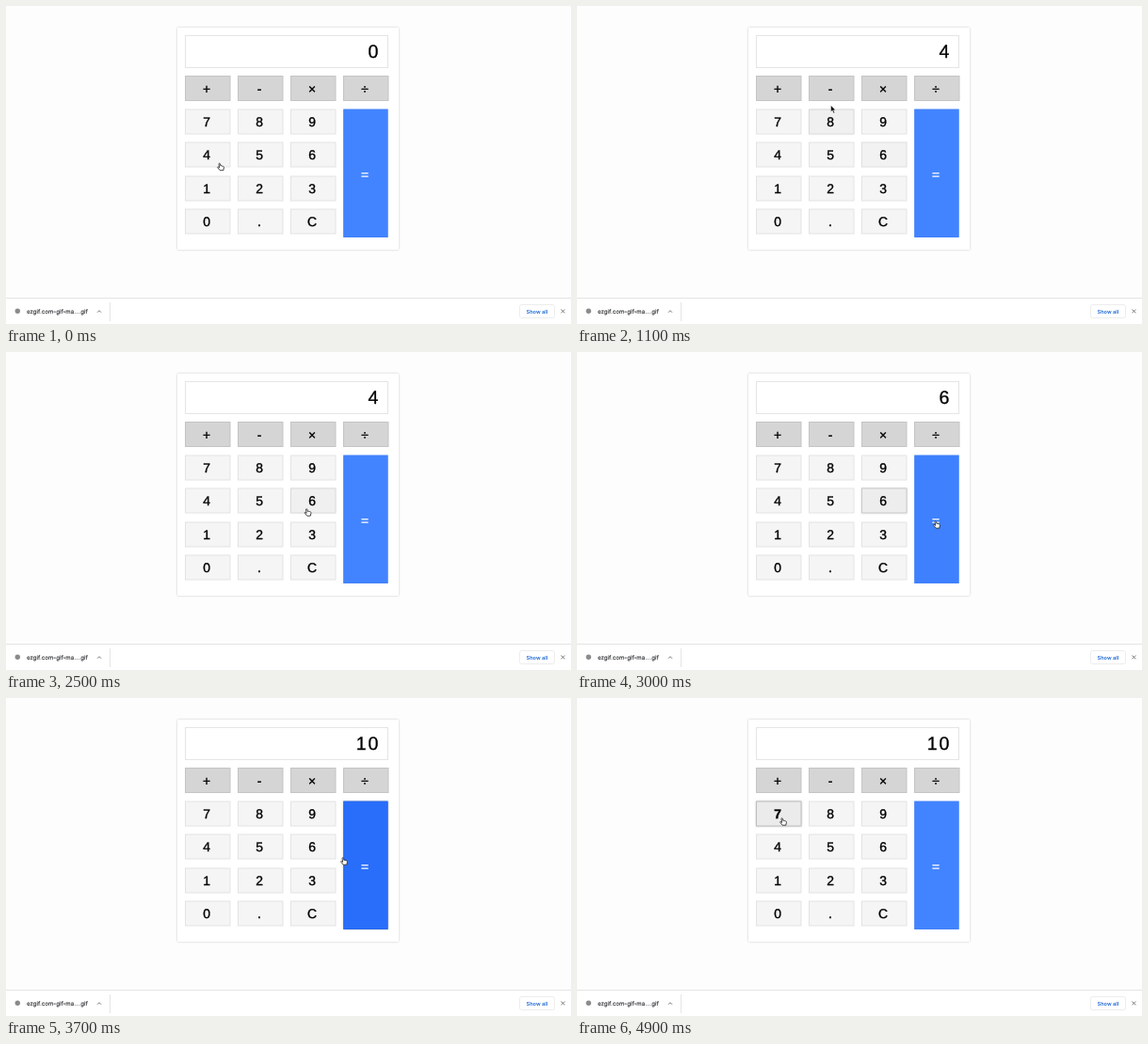
These frames come from a looping animation (600 by 338 pixels, 5 s). An HTML page:

```html
<!DOCTYPE html>
<html lang="en">
<head>
<meta charset="utf-8">
<title>Calculator</title>
<style>
  html, body { margin: 0; width: 100%; height: 100%; overflow: hidden; background: #fdfdfd; }
  svg { display: block; width: 600px; height: 338px; text-rendering: geometricPrecision; }
  .card { fill: #fff; filter: drop-shadow(0 .5px 1px rgba(0, 0, 0, .22)); }
  .keys text, .display { font-family: "Liberation Sans", Arial, sans-serif; }
  .keys text { font-size: 13.9px; text-anchor: middle; stroke: currentColor; stroke-width: .35; fill: currentColor; }
  .display { font-size: 19.6px; letter-spacing: 1.9px; text-anchor: end; stroke: #000; stroke-width: .3; }
  .bar text { font-family: Inter, Roboto, sans-serif; font-size: 6.15px; fill: #2b2d30; stroke: #2b2d30; stroke-width: .1; }
  .bar .link { font-size: 5.6px; font-weight: 600; fill: #1a66d6; stroke: none; }
  .line { fill: none; stroke: #e5e5e5; }
  .icon { fill: none; stroke: #55585c; stroke-width: .8; }
</style>
</head>
<body>
<svg viewBox="0 0 600 338">
  <rect class="card" x="182" y="23" width="235" height="236" rx="1"/>
  <rect class="line" x="190.5" y="31.5" width="215" height="34"/>
  <text class="display" id="display" x="397.4" y="54.5"></text>
  <g class="keys" id="keys"></g>
  <g class="bar">
    <rect y="311" width="600" height="27" fill="#fff"/>
    <path class="line" d="M0 310.5H600M110.5 315V335"/>
    <circle cx="12.3" cy="324.3" r="2.7" fill="#8b8b8b"/>
    <text x="22" y="326.9">ezgif.com-gif-ma....gif</text>
    <path class="icon" d="M97 325.7L99 323.7L101 325.7M589.5 322.5L593.3 326.3M593.3 322.5L589.5 326.3"/>
    <rect class="line" x="545.5" y="317.5" width="37" height="14" rx="2" stroke-opacity=".7"/>
    <text class="link" x="552.5" y="326.5">Show all</text>
  </g>
  <path id="arrow" d="M-1.5-4.5V2.6L.2 1.1L1.4 4L2.7 3.4L1.5.7H3.7Z" fill="#111" stroke="#fff" stroke-width=".5"/>
  <path id="hand" d="M-2.3-3.8C-1.6-4.7-.8-4.2-.6-3.4L0-1.1C.5-1.7 1.2-1.5 1.4-.9C2-1.4 2.7-1.1 2.9-.5C3.6-.7 4 0 3.9.9L3.2 4.2H-.9L-3.6 1C-4.2.1-3.3-.4-2.6.2L-1.5 1Z" fill="#fff" stroke="#222" stroke-width=".95" stroke-linejoin="round"/>
</svg>
<script>
const LOOP = 5000, STEP = 100, FADE = 300;
const $ = id => document.getElementById(id);
const clamp = v => Math.max(0, Math.min(1, v));
const mix = (a, b, k) => `rgb(${a.map((v, i) => Math.round(v + (b[i] - v) * k))})`;
const gray = v => [v, v, v];

// Resting and hovered colours: [fill, hover fill, border, hover border]
const styles = {
  number: [gray(245), gray(235), gray(227), gray(190)],
  operator: [gray(213), gray(204), gray(196), gray(176)],
  equals: [[66, 132, 255], [41, 110, 250], [66, 130, 250], [38, 102, 235]]
};

// Hover periods: [start, end]
const hovers = {
  "4": [[100, 600]], "6": [[700, 950], [2350, 2950]], "8": [[950, 1150]],
  "+": [[2150, 2350]], "=": [[2950, 3700]], "7": [[4500, 5300]]
};
const presses = { "4": [400, 600], "6": [2700, 2900], "7": [4800, 5000] };
const readings = [[0, "0"], [500, "4"], [2800, "6"], [3200, "10"]];

// Pointer path: [time, x, y, shape]
const path = [
  [0, 228, 171, "hand"], [100, 224, 167, "hand"], [500, 224, 167, "hand"],
  [700, 268, 171, "hand"], [900, 322, 172, "hand"], [1000, 292, 139, "arrow"],
  [1100, 271, 110, "arrow"], [1200, 276, 101, "arrow"], [1300, 280, 98, "hand"],
  [1500, 282, 97, "hand"], [1600, 282, 94, "hand"], [1700, 282, 94, "hand"],
  [2100, 213, 90, "hand"], [2300, 214, 91, "hand"], [2400, 268, 132, "arrow"],
  [2500, 320.5, 170.5, "hand"], [2800, 320.5, 170.5, "hand"], [3000, 382, 183.5, "hand"],
  [3600, 382, 183.5, "hand"], [3700, 359, 173.5, "hand"], [4000, 243.5, 143, "arrow"],
  [4400, 243.5, 143, "arrow"], [4500, 236, 139, "hand"], [4700, 222, 132, "hand"],
  [4900, 219, 131.5, "hand"], [5000, 219, 131.5, "hand"]
];

function add(tag, attrs) {
  const node = document.createElementNS("http://www.w3.org/2000/svg", tag);
  for (const name in attrs) node.setAttribute(name, attrs[name]);
  return $("keys").appendChild(node);
}

function makeKey(label, col, row, kind) {
  const x = 190.5 + col * 56, y = 74.7 + row * 35.3, isEquals = kind === "equals";
  const box = add("rect", {
    x: isEquals ? x + .2 : x, y: Math.round(y) + (row ? 0 : -.5),
    width: isEquals ? 46.5 : 47.5, height: isEquals ? 135.5 : 26
  });
  const text = add("text", {
    x: x + 22.5, y: isEquals ? 183.6 : y + 17.9, color: isEquals ? "#fff" : "#000"
  });
  text.textContent = label;
  return { label, kind, box, text };
}

const keys = [
  ...[..."+-×÷"].map((c, i) => makeKey(c, i, 0, "operator")),
  ...[..."7894561230.C"].map((c, i) => makeKey(c, i % 3, 1 + Math.floor(i / 3), "number")),
  makeKey("=", 3, 1, "equals")
];

function hoverLevel(label, t) {
  const level = ([start, end]) =>
    Math.min(clamp((t - start) / FADE), clamp((end - start) / FADE) - clamp((t - end) / FADE));
  return Math.max(0, ...(hovers[label] || []).map(level));
}

function drawKey({ label, kind, box, text }, t) {
  const k = hoverLevel(label, t), [fill, fillOn, edge, edgeOn] = styles[kind];
  const [start, end] = presses[label] || [0, 0];
  box.setAttribute("fill", mix(fill, fillOn, k));
  box.setAttribute("stroke", mix(edge, edgeOn, k * k));
  box.style.filter = k ? `drop-shadow(0 .5px 1px rgba(0,0,0,${.2 * k * k}))` : "none";
  text.setAttribute("font-weight", t >= start && t < end ? "bold" : "normal");
}

function drawPointer(t) {
  const i = path.findLastIndex(p => p[0] <= t);
  const [t0, x0, y0, shape] = path[i], [t1, x1, y1] = path[i + 1];
  const k = (t - t0) / (t1 - t0);
  const scale = shape === "hand" ? .88 : 1;
  for (const id of ["arrow", "hand"]) {
    $(id).style.display = id === shape ? "" : "none";
    $(id).setAttribute("transform", `translate(${x0 + (x1 - x0) * k} ${y0 + (y1 - y0) * k}) scale(${scale})`);
  }
}

function frame() {
  const t = Math.floor(performance.now() % LOOP / STEP) * STEP;
  $("display").textContent = readings.findLast(r => r[0] <= t)[1];
  keys.forEach(key => drawKey(key, t));
  drawPointer(t);
  requestAnimationFrame(frame);
}
frame();
</script>
</body>
</html>
```
